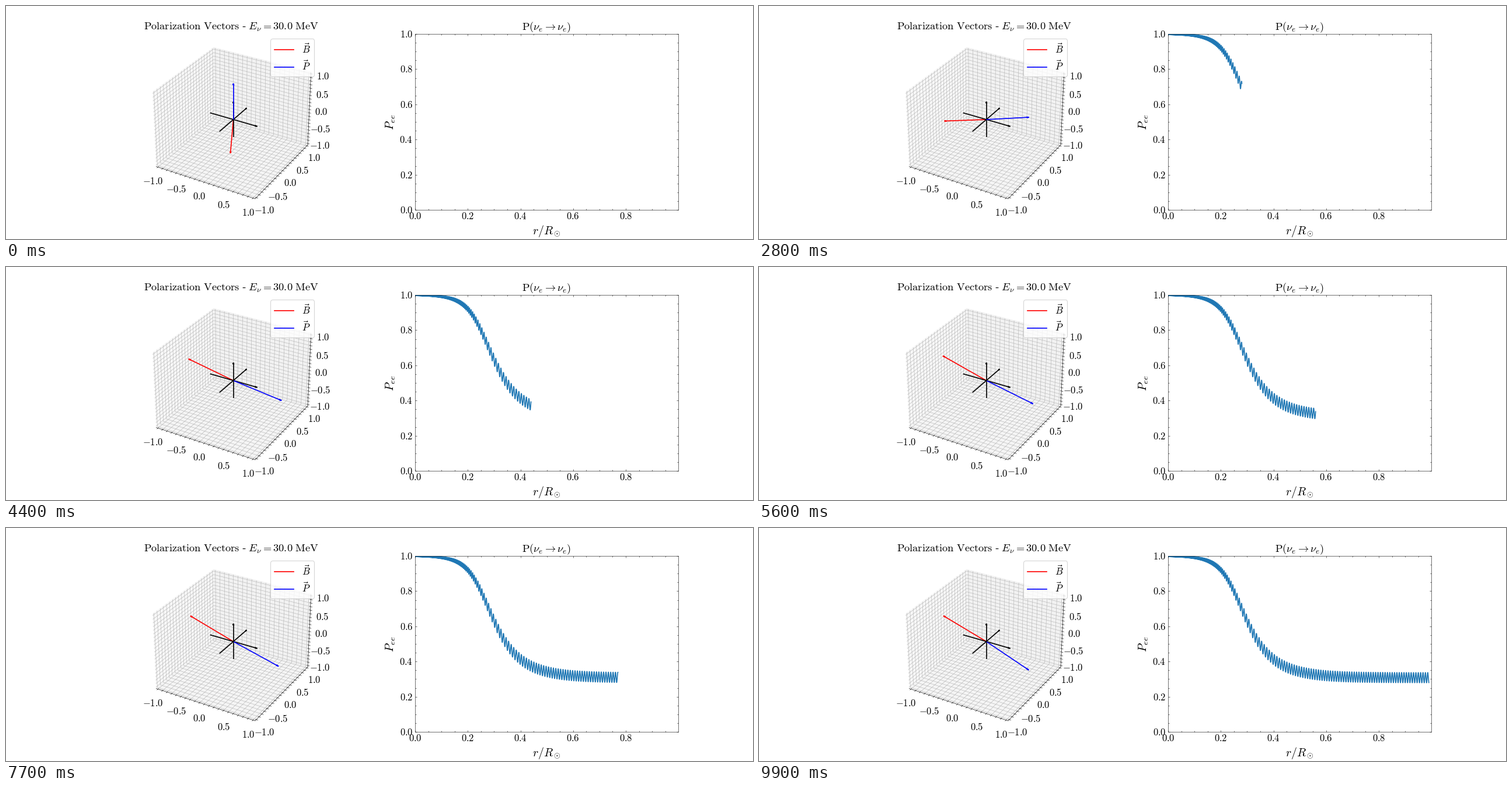
Write a matplotlib script that moves like this. It is 1280 px wide and 400 px high and loops after 10 s.

```python
import numpy as np
import matplotlib.pyplot as plt
from matplotlib.animation import FuncAnimation
from matplotlib.lines import Line2D
from matplotlib.ticker import MultipleLocator

plt.rcParams.update({
    "font.family": "Liberation Serif", "font.size": 15, "mathtext.fontset": "cm",
    "axes.linewidth": 0.5, "axes.labelsize": 18, "axes.titlesize": 16.5,
    "grid.linewidth": 0.5, "lines.linewidth": 1.5,
    "xtick.direction": "in", "ytick.direction": "in",
    "xtick.top": True, "ytick.right": True,
    "xtick.major.size": 3, "ytick.major.size": 3,
    "xtick.minor.size": 1.5, "ytick.minor.size": 1.5,
    "xtick.major.width": 0.5, "ytick.major.width": 0.5,
    "xtick.minor.width": 0.5, "ytick.minor.width": 0.5,
})

FRAMES, STEP = 100, 100          # frames per loop, samples per frame

# Adiabatic flavour conversion in an exponential density profile
COS2, X0, DECAY = 0.385, 15.0, 10.54
PERIOD = 0.008995                # vacuum oscillation length in solar radii
SIN2 = np.sqrt(1 - COS2**2)

r = np.linspace(0, 1, FRAMES * STEP + 1)
shift = X0 * np.exp(-DECAY * r) - COS2
omega = np.hypot(shift, SIN2)
sn, cs = SIN2 / omega, shift / omega
turns = np.concatenate([[0], np.cumsum((omega[1:] + omega[:-1]) / 2 * np.diff(r))])
phase = 2 * np.pi * turns / PERIOD

# P precesses around -B on a cone fixed by the starting angle
sa, ca = sn[0], cs[0]
B = np.stack([-sn, 0 * r, -cs], axis=1)
P = np.stack([ca * sn - sa * np.cos(phase) * cs,
              -sa * np.sin(phase),
              ca * cs + sa * np.cos(phase) * sn], axis=1)
prob = (1 + P[:, 2]) / 2


def set_ticks(axis, major, minor):
    axis.set_major_locator(MultipleLocator(major))
    axis.set_minor_locator(MultipleLocator(minor))
    axis.set_major_formatter(lambda v, _: f"${v:.1f}$")


def arrow(start, vec, color):
    return ax3.quiver(*start, *vec, color=color, arrow_length_ratio=0.05)


fig = plt.figure(figsize=(16, 5), dpi=80)
fig.subplots_adjust(left=0.125, right=0.9, bottom=0.125, top=0.88, wspace=0.2)

ax3 = fig.add_subplot(1, 2, 1, projection="3d")
edge = 25 / 24
ax3.set(xlim=(-edge, edge), ylim=(-edge, edge), zlim=(-edge, edge))
for axis in (ax3.xaxis, ax3.yaxis, ax3.zaxis):
    set_ticks(axis, 0.5, 0.1)
for unit in np.eye(3):
    arrow(-unit / 2, unit, "black")
ax3.set_title(r"$\mathrm{Polarization\ Vectors\ }$-$\mathrm{\ }E_\nu = 30.0\mathrm{\ MeV}$")
ax3.legend([Line2D([], [], color="red"), Line2D([], [], color="blue")],
           [r"$\vec{B}$", r"$\vec{P}$"], loc="upper right")

ax = fig.add_subplot(1, 2, 2)
ax.set(xlim=(0, 0.9995), ylim=(0, 1), xlabel=r"$r/R_\odot$", ylabel=r"$P_{ee}$")
ax.set_title(r"$\mathrm{P}(\nu_e \rightarrow \nu_e)$")
set_ticks(ax.xaxis, 0.2, 0.05)
set_ticks(ax.yaxis, 0.2, 0.05)
curve, = ax.plot([], [], color="tab:blue")

vectors = []


def update(i):
    k = i * STEP
    while vectors:
        vectors.pop().remove()
    vectors.append(arrow((0, 0, 0), B[k], "red"))
    vectors.append(arrow((0, 0, 0), P[k], "blue"))
    curve.set_data(r[:k + 1], prob[:k + 1])
    return [curve, *vectors]


anim = FuncAnimation(fig, update, frames=FRAMES, interval=100,
                     init_func=lambda: update(0), repeat=True, repeat_delay=0)
plt.show()
```
